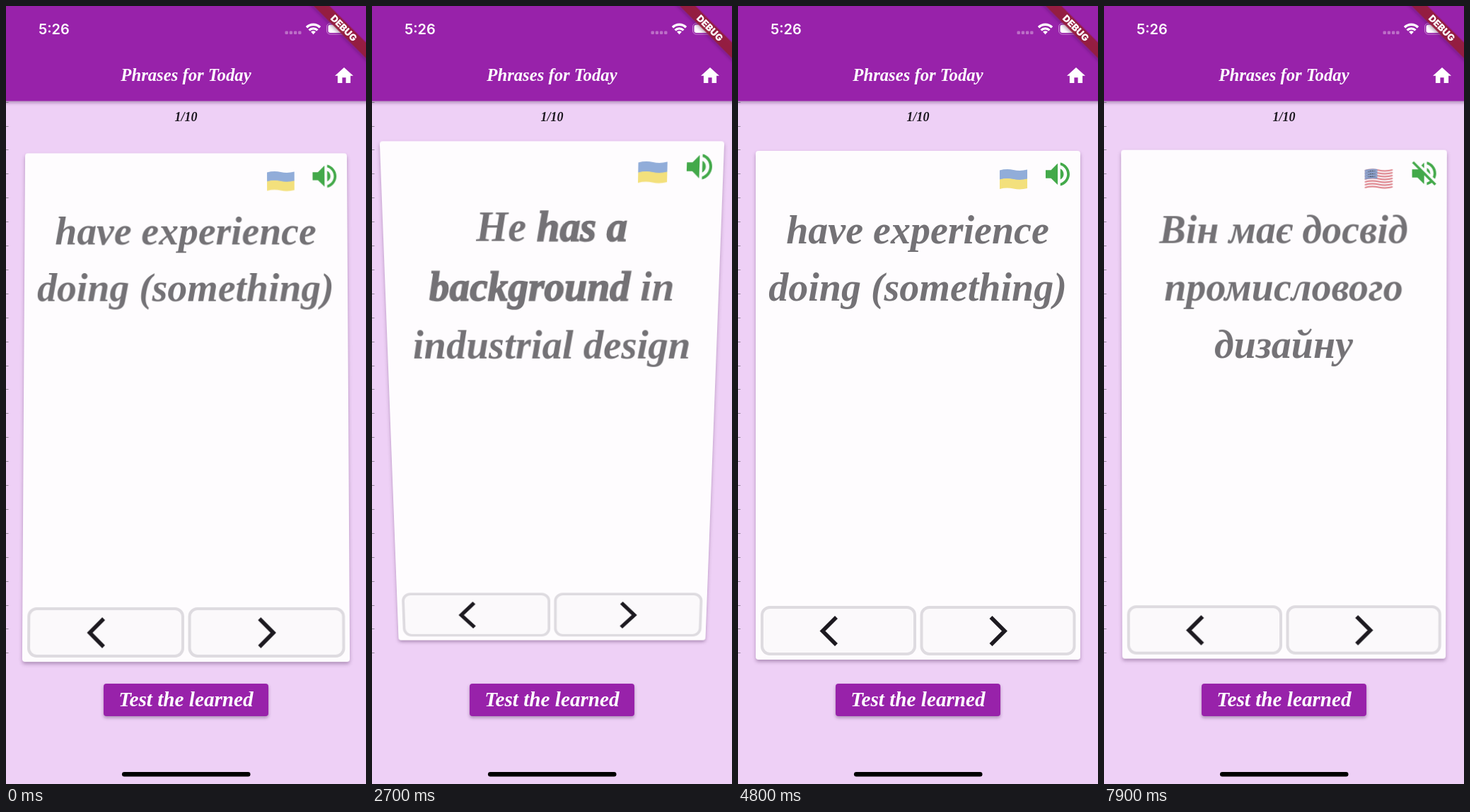
Write an HTML page that moves like this. It is 509x1101 px and loops after 8000 ms.

```html
<!DOCTYPE html>
<html lang="en">
<head>
<meta charset="utf-8">
<title>Phrase cards</title>
<style>
  html, body { margin: 0; width: 100%; height: 100%; overflow: hidden; background: #eed0f6; }
  body { position: relative; }
  svg { position: absolute; left: 0; top: 0; overflow: visible; }
  text { font-family: "Liberation Serif", serif; font-weight: 700; font-style: italic; text-anchor: middle; }
  #card {
    position: absolute; left: 25px; top: 205px; width: 459px; height: 720px;
    border-radius: 4px; background: #fefcfe; box-shadow: 0 3px 5px rgba(60, 20, 70, .34);
  }
  #lines text { font-size: 56px; fill: #747276; }
  #lines .strong { stroke: #747276; stroke-width: 1.6px; }
  .key { fill: #fbf9fb; stroke: #dedbe0; stroke-width: 4; }
  .arrow { fill: none; stroke: #1d1a20; stroke-width: 5.6; }
  text.clock { font: 600 20px Inter, sans-serif; text-anchor: start; }
  text.tag { font: 900 13.3px Inter, sans-serif; }
</style>
</head>
<body>
<svg width="509" height="1101">
  <defs>
    <filter id="soft" x="-20%" y="-20%" width="140%" height="160%">
      <feDropShadow dx="0" dy="2.5" stdDeviation="2.2" flood-color="#3c1446" flood-opacity=".36"/>
    </filter>
  </defs>
  <path id="ticks" stroke="#8f8494" stroke-width="1"/>
  <rect x="-10" y="-10" width="529" height="144.5" fill="#9822aa" filter="url(#soft)"/>
  <text class="clock" x="46" y="40" fill="#fff">5:26</text>
  <g fill="#fff" fill-opacity=".35">
    <rect x="394.5" y="35.5" width="4.4" height="4.4" rx="1.2"/>
    <rect x="400.7" y="35.5" width="4.4" height="4.4" rx="1.2"/>
    <rect x="406.9" y="35.5" width="4.4" height="4.4" rx="1.2"/>
    <rect x="413.1" y="35.5" width="4.4" height="4.4" rx="1.2"/>
  </g>
  <g fill="none" stroke="#fff" stroke-width="3.4">
    <path d="M425 30.2a13.3 13.3 0 0 1 19 0M428.6 34.4a8.2 8.2 0 0 1 11.8 0"/>
    <path d="M434.5 40.2l-3.4-3.6a4.7 4.7 0 0 1 6.8 0z" fill="#fff" stroke="none"/>
  </g>
  <rect x="453.5" y="24.5" width="29" height="15.5" rx="5" fill="none" stroke="#fff" stroke-opacity=".45"/>
  <rect x="455.5" y="26.5" width="25" height="11.5" rx="3" fill="#fff"/>
  <text x="254.5" y="106" font-size="24.7" fill="#fff">Phrases for Today</text>
  <path transform="translate(462.4 83.1) scale(1.3)" fill="#fff" d="M10 20v-6h4v6h5v-8h3L12 3 2 12h3v8z"/>
  <g transform="translate(509 0) rotate(45)">
    <rect x="-60" y="36.5" width="120" height="15.7" fill="#961c3c" fill-opacity=".93" filter="url(#soft)"/>
    <text class="tag" x="0" y="49" fill="#fff">DEBUG</text>
  </g>
  <text x="254.5" y="163" font-size="18" fill="#1c1820">1/10</text>
  <rect x="138" y="959" width="233" height="46" rx="4" fill="#9822aa" filter="url(#soft)"/>
  <text x="254.5" y="991" font-size="29.2" fill="#fff">Test the learned</text>
  <rect x="164" y="1084" width="181.5" height="6.5" rx="3.2"/>
</svg>

<div id="card">
  <svg width="459" height="720">
    <g id="flag"></g>
    <path id="sound" fill="#43a94a" transform="translate(404.3 10.3) scale(1.89)"/>
    <g id="lines"></g>
    <rect class="key" x="9" y="646" width="216" height="66" rx="11"/>
    <rect class="key" x="234.5" y="646" width="216" height="66" rx="11"/>
    <path class="arrow" d="M114 660L94.5 679.5 114 699M332.5 660L352 679.5 332.5 699"/>
  </svg>
</div>

<script>
const LOOP = 8000, FLIP = 1050, LANG_AT = 5600, DEPTH = 1305;
const $ = id => document.getElementById(id);
const clamp = x => Math.min(1, Math.max(0, x));

const strong = s => `<tspan class="strong">${s}</tspan>`;
const texts = {
  en: [
    ['have experience', 'doing (something)'],
    ['He ' + strong('has a'), strong('background') + ' in', 'industrial design']
  ],
  uk: [
    ['мати досвід', 'робити (щось)'],
    ['Він має досвід', 'промислового', 'дизайну']
  ]
};

const speaker = {
  en: 'M3 9v6h4l5 5V4L7 9H3zm13.5 3c0-1.77-1.02-3.29-2.5-4.03v8.05c1.48-.73 2.5-2.25 2.5-4.02zM14 3.23v2.06c2.89.86 5 3.54 5 6.71s-2.11 5.85-5 6.71v2.06c4.01-.91 7-4.49 7-8.77s-2.99-7.86-7-8.77z',
  uk: 'M16.5 12c0-1.77-1.02-3.29-2.5-4.03v2.21l2.45 2.45c.03-.2.05-.41.05-.63zm2.5 0c0 .94-.2 1.82-.54 2.64l1.51 1.51C20.63 14.91 21 13.5 21 12c0-4.28-2.99-7.86-7-8.77v2.06c2.89.86 5 3.54 5 6.71zM4.27 3L3 4.27 7.73 9H3v6h4l5 5v-6.73l4.25 4.25c-.67.52-1.42.93-2.25 1.18v2.06c1.38-.31 2.63-.95 3.69-1.81L19.73 21 21 19.73l-9-9L4.27 3zM12 4L9.91 6.09 12 8.18V4z'
};

// A wavy stripe of a flag
function band(x, y, h, color) {
  return `<path fill="${color}" d="M${x} ${y}q9.7-2.5 19.5-.5t19.5-.5v${h}q-9.7 2.5-19.5.5t-19.5.5z"/>`;
}

function flagOf(lang) {
  if (lang === 'en') return band(345, 27.5, 13.5, '#91add9') + band(345, 40.5, 13.5, '#f3e07c');
  let out = band(343.5, 28, 26, '#f7eef1');
  for (let i = 0; i < 7; i++) out += band(343.5, 28 + i * 4, 2, '#df868e');
  return out + '<path fill="#869ac6" d="M343.5 28q9-2.5 17.5-1v13.5q-8.5-1.5-17.5 1z"/>' +
    '<path stroke="#dfe4f1" stroke-width="1" stroke-dasharray="1.2 2" d="M346 30.5q7-2 14-1M346 34.5q7-2 14-1M346 38q7-2 14-1"/>';
}

// Ease in-out with overshoot: cubic (.68, -.55) (.265, 1.55)
function easeBack(x) {
  if (x <= 0 || x >= 1) return clamp(x);
  const bez = (a, b, s) => 3 * a * s * (1 - s) ** 2 + 3 * b * s * s * (1 - s) + s ** 3;
  let lo = 0, hi = 1;
  for (let i = 0; i < 30; i++) {
    const mid = (lo + hi) / 2;
    if (bez(.68, .265, mid) < x) lo = mid; else hi = mid;
  }
  return bez(-.55, 1.55, lo);
}

let shown = '';
function fill(lang, side) {
  if (shown === lang + side) return;
  shown = lang + side;
  $('lines').innerHTML = texts[lang][side]
    .map((s, i) => `<text x="229" y="${131 + i * 81}">${s}</text>`).join('');
  $('flag').innerHTML = flagOf(lang);
  $('sound').setAttribute('d', speaker[lang]);
}

function render(t) {
  const step = start => clamp((t - start) / FLIP);
  const v = easeBack(step(-13) - step(2584) + step(7236));
  const side = v < .5 ? 0 : 1;
  fill(t < LANG_AT ? 'en' : 'uk', side);
  const angle = 180 * (side - v);
  $('card').style.transform = `perspective(${DEPTH}px) rotateX(${angle}deg)`;
}

let marks = '';
for (let i = 1; i <= 27; i++) marks += `M0 ${Math.round(i * 33.9) + .5}h3.5`;
$('ticks').setAttribute('d', marks);

const begin = performance.now();
function frame() {
  render((performance.now() - begin) % LOOP);
  requestAnimationFrame(frame);
}
frame();
</script>
</body>
</html>
```
